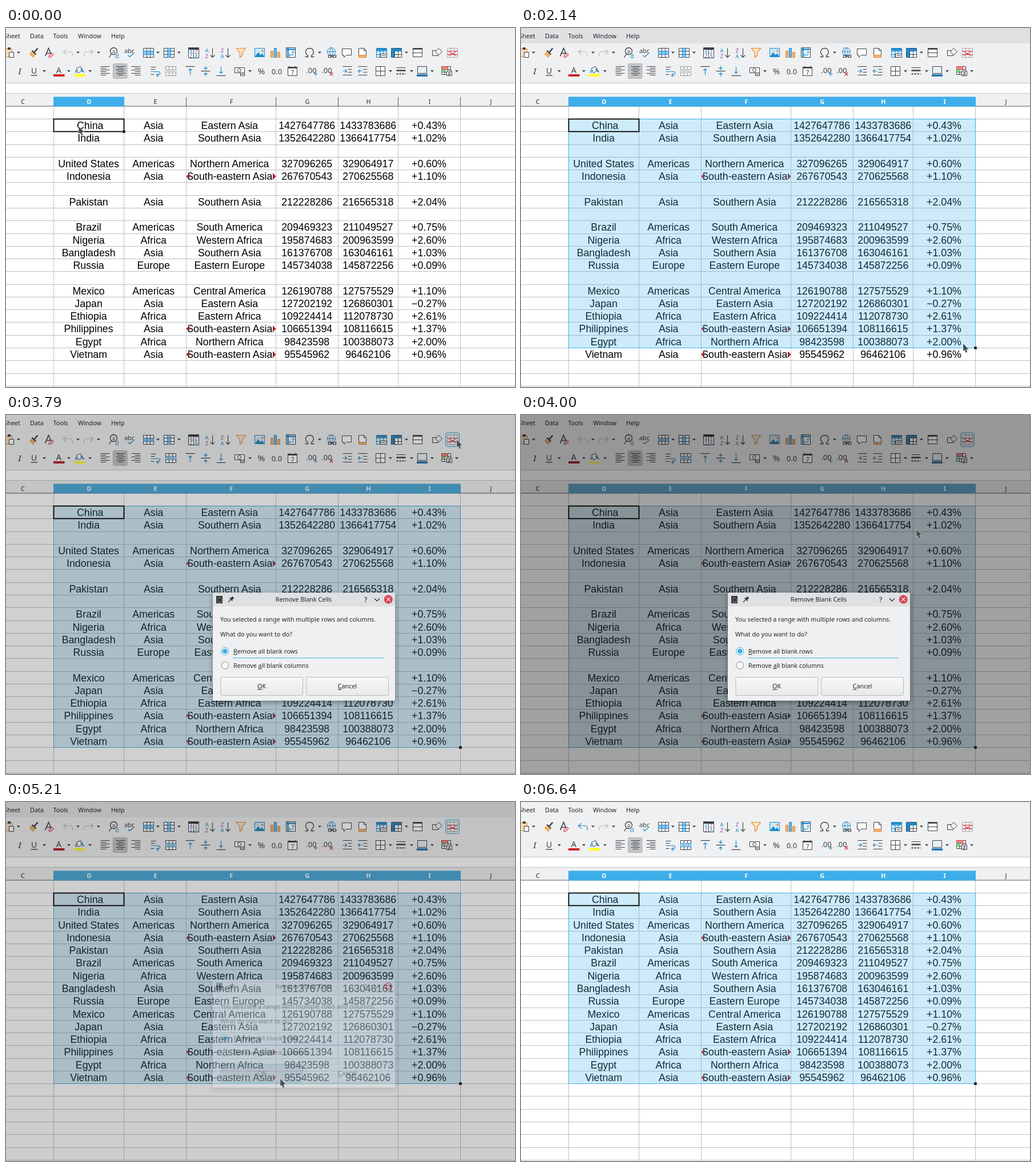
An HTML page that plays this animation: 891 by 629 pixels, repeating every 6.87 s.

```html
<!DOCTYPE html>
<html lang="en">
<head>
<meta charset="utf-8">
<title>Remove blank rows</title>
<style>
  html, body { margin: 0; width: 100%; height: 100%; overflow: hidden; background: #fff; }
  svg { display: block; width: 100vw; height: 100vh; }
  text { font-family: "Noto Sans", sans-serif; font-size: 10.8px; fill: #232629; white-space: pre; }
  .cell { font-family: "Liberation Sans", Arial, sans-serif; font-size: 17.8px; fill: #000; text-anchor: middle; }
  .mid { text-anchor: middle; }
  .u { text-decoration: underline; }
</style>
</head>
<body>
<svg id="stage" viewBox="0 0 891 629" preserveAspectRatio="none">
  <defs>
    <linearGradient id="btn" x2="0" y2="1"><stop stop-color="#f8f8f8"/><stop offset="1" stop-color="#e8e9ea"/></linearGradient>
    <linearGradient id="down" x2="0" y2="1"><stop stop-color="#c2c3c4"/><stop offset="1" stop-color="#cecfd0"/></linearGradient>
    <clipPath id="narrow"><rect x="319" y="0" width="148.5" height="23"/></clipPath>
  </defs>
</svg>
<script>
const LOOP = 6870, FRAME = 1000 / 14;
const INK = '#3b4045', BLUE = '#1e8bcd', SEL = '#3daee9', RED = '#d8303a', ORANGE = '#e8862a', GREY = '#b9bbbd';
const stage = document.getElementById('stage');

function el(name, attrs, parent) {
  const e = document.createElementNS('http://www.w3.org/2000/svg', name);
  for (const k in attrs) e.setAttribute(k, attrs[k]);
  return parent.appendChild(e);
}
const group = (p, attrs = {}) => el('g', attrs, p);
const path = (p, d, stroke = 'none', fill = 'none', w = 1) => el('path', { d, stroke, fill, 'stroke-width': w }, p);
const rect = (p, x, y, width, height, fill, more = {}) => el('rect', { x, y, width, height, fill, ...more }, p);
function text(p, x, y, s, attrs = {}) {
  const t = el('text', { x, y, ...attrs }, p);
  t.textContent = s;
  return t;
}
const set = (e, attrs) => { for (const k in attrs) e.setAttribute(k, attrs[k]); };
const show = (e, on) => e.setAttribute('visibility', on ? 'inherit' : 'hidden');

// ---- window frame
const app = group(stage);
rect(app, 0, 0, 891, 629, '#fff');
rect(app, 0, 0, 891, 137, '#eff0f1');
const menu = rect(app, 0, 0, 891, 27, '#dee0e2');
text(app, 25, 17.5, 'Sheet', { 'text-anchor': 'end' });
[[42, 'Data'], [82.5, 'Tools'], [126, 'Window'], [184, 'Help']].forEach(([x, s]) => text(app, x, 17.5, s));
rect(app, 0, 96, 891, 18, '#fff');
path(app, 'M0 96.5H891M0 114.5H891', '#c3c5c7');

// ---- toolbar
function icon(x, y, ...parts) {
  const g = group(app, { transform: `translate(${x + .5} ${y + .5})` });
  parts.forEach(p => path(g, ...p));
  return g;
}
const letter = (g, x, y, s, size, fill = INK, more = {}) =>
  text(g, x, y, s, { class: 'mid', style: `font-size:${size}px;fill:${fill}`, ...more });
const drop = (y, ...xs) => xs.forEach(x => path(app, `M${x - 3} ${y - 1.5}h6l-3 3.2z`, 'none', INK));
const box = (x, y, w, h) => `M${x} ${y}h${w}v${h}h${-w}z`;
const GRID = box(-9, -8, 18, 16) + 'M-9 -3H9M-9 3H9M-3 -8V8M3 -8V8';
const A = 43, B = 75;

icon(8, A, ['M-12 -7H2V7H-12', ORANGE, '#f9dcb9'], [box(-3, -1, 8, 9), INK, '#fff'], ['M-5 -9h4v3h-4z', INK, INK]);
icon(48, A, ['M1 -1L7 -8', INK, 'none', 2.4], ['M-7 2L-2 -3L3 2L-1 8Z', ORANGE, '#f3b563'], ['M-3 -4L4 3', INK, 'none', 2]);
icon(75, A, ['M-7 6L-1 -8L5 6M-5 1H3', INK, 'none', 1.6], ['M-1 6L5 0L8 3L3 8H0Z', RED, '#f3b5b8']);
const undo = icon(108, A, ['M-3 -6L-8 -2L-3 3M-8 -2H3Q8 -2 8 6', GREY, 'none', 1.2]).firstChild;
icon(144, A, ['M3 -6L8 -2L3 3M8 -2H-3Q-8 -2 -8 6', GREY, 'none', 1.2]);
const find = icon(189, A, ['M5 -3A6 6 0 1 1 -7 -3A6 6 0 1 1 5 -3ZM-5 2L-9 8', INK, 'none', 1.3]);
letter(find, -1, 0, 'a', 9); letter(find, 5, 9, 'd', 11, BLUE);
const spell = icon(216, A, ['M-3 4L0 7L7 1', BLUE, 'none', 1.3]);
letter(spell, -.5, 0, 'abc', 11);
icon(249, A, [GRID, INK, '#fff'], [box(-9, -3, 18, 6), BLUE, '#8cc6ec'], ['M-3 -3V3M3 -3V3', BLUE]);
icon(285, A, [GRID, INK, '#fff'], [box(-3, -8, 6, 16), BLUE, '#8cc6ec'], ['M-3 -3H3M-3 3H3', BLUE]);
const sort = icon(328, A, [box(-9, -9, 18, 18), INK, '#fff'], ['M-9 -7H9', INK, 'none', 3], ['M0 -6V9', INK]);
[[-4.5, 1, 'A', BLUE], [4.5, 1, 'Z', '#8a4baf'], [-4.5, 8.5, 'Z', '#8a4baf'], [4.5, 8.5, 'A', BLUE]]
  .forEach(([x, y, s, c]) => letter(sort, x, y, s, 8, c));
[[356, 'A', 'Z'], [383, 'Z', 'A']].forEach(([x, a, b]) => {
  const g = icon(x, A, ['M5 -8V8M1 4L5 8L9 4', INK, 'none', 1.1]);
  letter(g, -5, -1, a, 9.5, a === 'A' ? BLUE : '#8a4baf');
  letter(g, -5, 9, b, 9.5, b === 'A' ? BLUE : '#8a4baf');
});
icon(411, A, ['M-8 -8H8L2 0V5L-2 8V0Z', ORANGE, '#fbe6c8', 1.2]);
icon(444, A, [box(-9, -8, 17, 15), BLUE, '#cfe8f8'], ['M-9 7L-3 -1L1 4L4 1L8 7Z', 'none', BLUE], ['M3 -5h3v3h-3z', 'none', ORANGE]);
icon(471, A, [box(-8, -3, 4, 11), ORANGE, '#f6b26b'], [box(-2, -8, 4, 16), BLUE, '#6bb6e6'], [box(4, -1, 4, 9), ORANGE, '#f6b26b']);
icon(498, A, [box(-8, -9, 16, 17), INK, '#fff'], ['M-8 -6H8M-5 -9V8', BLUE, 'none', 2.5], ['M-2 4H4V-2M-1 1L-3 4L-1 7M1 0L4 -3L7 0', BLUE]);
icon(531, A, ['M-8 7H-3V5Q-7 2 -7 -2Q-6 -8 0 -8Q6 -8 7 -2Q7 2 3 5V7H8', INK, 'none', 1.3]);
icon(569, A, ['M7 -2A7 7 0 1 1 -7 -2A7 7 0 1 1 7 -2ZM-7 -2H7M0 -9Q-6 -2 0 5Q6 -2 0 -9', BLUE], ['M-5 4h5v4h-5zM3 4h5v4h-5zM-2 6H5', INK, 'none', 1.2]);
icon(596, A, ['M-8 -7H8V4H-1L-5 8V4H-8Z', INK, '#fff']);
icon(623, A, ['M-6 -8H3L7 -4V8H-6Z', INK, '#fff'], ['M-6 4H7V8H-6Z', ORANGE, '#f6b26b'], ['M3 -8V-4H7', INK]);
icon(657, A, [GRID, BLUE, '#d8edf9'], ['M-9 -6H9', BLUE, 'none', 4], [box(-2, 2, 11, 6), INK, '#fff'], ['M0 5H7', INK]);
icon(683, A, [GRID, INK, '#fff'], ['M-9 -5H9M-6 -8V8', BLUE, 'none', 5], ['M-1 3H8M3 -1V8', INK]);
icon(720, A, [box(-8, -8, 16, 15), INK, '#fff'], ['M-8 -7H8', INK, 'none', 2.5], ['M-9 0H9', INK, 'none', 1]);
icon(754, A, ['M-8 -4h10v9h-10z', INK], ['M3 -8L9 -2L3 4L-3 -2Z', INK, '#eff0f1']);
const hover = rect(app, 769.5, 31, 24, 24.5, '#d3e5ef', { rx: 3, stroke: SEL });
icon(781, A, [box(-9, -8, 18, 16) + 'M-3 -8V8M3 -8V8', '#a5a8ab', '#f7f7f7'], ['M-9 -3H9M-9 3H9', RED], ['M-7 -2L7 5M-7 5L7 -2', RED]);
drop(A, 22, 126, 162, 266, 303, 549, 701);

letter(app, 24, 80.5, 'I', 15, INK, { 'font-style': 'italic', 'font-family': 'Noto Serif' }).style.fontFamily = '"Noto Serif", serif';
letter(app, 49, 79.5, 'U', 14); path(app, 'M43.5 83H55', INK, 'none', 1.3);
letter(app, 92.5, 79, 'A', 14.5); rect(app, 83, 81, 19.5, 4, '#d01f26');
icon(128, B, ['M-5 -5L2 -8L6 -1L-2 3Z', INK, '#fff'], ['M-6 -2L-6 3', BLUE, 'none', 2], ['M2 -4L8 2', BLUE, 'none', 2]);
rect(app, 119, 81, 19, 4, '#ffff00');
rect(app, 187.5, 62.5, 24.5, 26, '#c3c5c7', { rx: 2, stroke: '#b2b4b6' });
[[173, -8], [200, -5], [227, -2]].forEach(([x, s]) => {
  let d = '';
  for (let i = 0; i < 6; i++) d += i % 2 ? `M${s} ${i * 3 - 8}h10` : `M-8 ${i * 3 - 8}h16`;
  icon(x, B, [d, INK]);
});
icon(261, B, ['M-8 -7H1M-8 -3H-1M-8 6H-2', INK], ['M-8 1H6Q8 1 8 4Q8 7 3 7M5 4L2 7L5 10', BLUE, 'none', 1.2]);
const merge = icon(288, B, [GRID, INK, '#fff'], [box(-9, -3, 18, 6), BLUE, '#cfe8f8'], ['M-6 0H6M-4 -2L-6 0L-4 2M4 -2L6 0L4 2', BLUE]);
[[322, -8, 'M0 7V-4M-3 -1L0 -4L3 -1'], [349, 0, 'M0 -9V-3M-3 -6L0 -3L3 -6M0 9V3M-3 6L0 3L3 6'], [376, 8, 'M0 -8V4M-3 1L0 4L3 1']]
  .forEach(([x, y, d]) => icon(x, B, [`M-8 ${y}H8`, INK, 'none', 1.2], [d, BLUE, 'none', 1.2]));
icon(409, B, [box(-9, -6, 17, 9), INK, '#fff'], ['M2 -1.5A3 3 0 1 1 -4 -1.5A3 3 0 1 1 2 -1.5Z', INK], ['M1 3h7v5h-7zM1 5.5H8', INK, '#fff']);
letter(app, 447, 80.5, '%', 15);
letter(app, 474, 80.5, '0.0', 13);
const date = icon(501, B, [box(-8, -7, 16, 15), INK, '#fff'], ['M-8 -6H8', INK, 'none', 2.5], ['M-5 -9V-5M5 -9V-5', INK]);
letter(date, 0, 6, '7', 10);
[[535, BLUE, 'M3 5H10M6.5 1.5V8.5'], [562, RED, 'M4 2L10 8M10 2L4 8']].forEach(([x, c, d]) => {
  letter(icon(x, B, [d, c, 'none', 1.2]), -1, 3, '.00', 13);
});
[[597, 'M-8 0H-1M-4 -3L-1 0L-4 3'], [624, 'M-1 0H-8M-5 -3L-8 0L-5 3']]
  .forEach(([x, d]) => icon(x, B, ['M-8 -8H8M1 -3H8M1 2H8M-8 7H8', INK], [d, BLUE, 'none', 1.2]));
icon(655, B, [box(-8, -8, 16, 16) + 'M0 -8V8M-8 0H8', INK, '#fff']);
icon(691, B, ['M-8 -6H8', INK, 'none', 1], ['M-8 -1H8', INK, 'none', 2.5], ['M-8 5H8', INK, 'none', 2], ['M-5 5h2M0 5h2M5 5h2', '#eff0f1', 'none', 3]);
icon(728, B, [box(-8, -8, 16, 12), INK, '#e4f1f9']); rect(app, 719, 81, 19, 4, '#2a7ab8');
icon(771, B, [box(-9, -8, 16, 14) + 'M-9 -3H7M-9 2H7M-4 -8V6M2 -8V6', INK, '#fff'], [box(-9, -8, 11, 5), RED, '#ef8b8f'],
  [box(-9, -3, 6, 5), '#3a9a4a', '#8dcf98'], [box(0, 0, 9, 8), INK, '#fff'], ['M2 3H7M2 6H7M6 1L3 8', INK]);
drop(B + .5, 67, 110, 147, 427, 673, 710, 746, 789);

// ---- sheet
const cols = [83.5, 206.5, 315.5, 472.5, 581.5, 686.5, 795.5];
const centers = [144.6, 258.2, 391.3, 526.7, 633.8, 740.5];
const rowY = k => Math.round(159 + 22.28 * k) + .5;
let lines = '';
for (let k = 0; k < 22; k++) lines += `M0 ${rowY(k)}H891`;
cols.forEach(x => lines += `M${x} 137V629`);
path(app, lines, '#c0c0c0');
path(app, 'M0 137H891' + cols.map(x => `M${x} 121V137`).join(''), '#55585b');
text(app, 29.5, 132.5, 'C', { class: 'mid' });
text(app, 849, 132.5, 'J', { class: 'mid' });
const heads = [...'DEFGHI'].map((s, i) => {
  const bg = rect(app, cols[i] - .5, 120.5, cols[i + 1] - cols[i] + 1, 17, SEL);
  const edge = path(app, `M${cols[i + 1]} 121V137`, '#3592c5');
  return { bg, edge, label: text(app, (cols[i] + cols[i + 1]) / 2 + .5, 132.5, s, { class: 'mid' }) };
});

const rows = `China|Asia|Eastern Asia|1427647786|1433783686|+0.43%
India|Asia|Southern Asia|1352642280|1366417754|+1.02%

United States|Americas|Northern America|327096265|329064917|+0.60%
Indonesia|Asia|South-eastern Asia|267670543|270625568|+1.10%

Pakistan|Asia|Southern Asia|212228286|216565318|+2.04%

Brazil|Americas|South America|209469323|211049527|+0.75%
Nigeria|Africa|Western Africa|195874683|200963599|+2.60%
Bangladesh|Asia|Southern Asia|161376708|163046161|+1.03%
Russia|Europe|Eastern Europe|145734038|145872256|+0.09%

Mexico|Americas|Central America|126190788|127575529|+1.10%
Japan|Asia|Eastern Asia|127202192|126860301|−0.27%
Ethiopia|Africa|Eastern Africa|109224414|112078730|+2.61%
Philippines|Asia|South-eastern Asia|106651394|108116615|+1.37%
Egypt|Africa|Northern Africa|98423598|100388073|+2.00%
Vietnam|Asia|South-eastern Asia|95545962|96462106|+0.96%`.split('\n')
  .map((line, full) => ({ line, full })).filter(r => r.line);
rows.forEach((r, packed) => {
  r.packed = packed;
  r.g = group(app);
  r.line.split('|').forEach((s, i) => {
    const long = s.startsWith('South-');
    const t = text(r.g, centers[i] + (s === 'China' ? 2.6 : 0), 17.8, s, { class: 'cell' });
    if (long) {
      t.setAttribute('clip-path', 'url(#narrow)');
      path(r.g, 'M316 11.5l4.5 -5v10zM472 11.5l-4.5 -5v10z', '#4a1010', '#d3141c', .7);
    }
  });
});
const tint = rect(app, 83.5, 159.5, 0, 0, SEL, { 'fill-opacity': .25, stroke: SEL });
rect(app, 83.5, 159.5, 123, 22, 'none', { stroke: '#000', 'stroke-width': 1.8 });
const handle = rect(app, 0, 0, 5, 5, '#000', { stroke: '#fff', 'stroke-width': .5 });

const tip = group(app, { style: 'filter:drop-shadow(0 1px 2px rgba(0,0,0,.3))' });
rect(tip, 768.5, 92.5, 78.5, 20.5, '#f6f6f6', { rx: 3, stroke: '#c2c4c6' });
text(tip, 807.7, 107, 'Conditional', { class: 'mid', style: 'font-size:11.8px;font-weight:bold;fill:#77797b' });

// ---- dialog
const dlg = group(stage, { style: 'filter:drop-shadow(0 3px 5px rgba(0,0,0,.4))' });
rect(dlg, 362, 311.5, 319, 189, '#eff0f1', { rx: 2 });
rect(dlg, 362, 311.5, 319, 24, '#dee0e2', { rx: 2 });
text(dlg, 521, 327.3, 'Remove Blank Cells', { class: 'mid' });
path(dlg, 'M368 317h11v13h-11z', 'none', '#2f3337');
path(dlg, 'M371 320h4l2 2v6h-6z', '#8d9194');
path(dlg, 'M389 328l4 -4', INK, 'none', 1.2);
path(dlg, 'M391 321l3 0l2 -3l3 3l-3 2l0 3z', INK, INK);
text(dlg, 629.5, 328, '?', { class: 'mid', style: 'font-size:13px' });
path(dlg, 'M645 321.5l4.5 4.5l4.5 -4.5', '#232629', 'none', 1.1);
el('circle', { cx: 669.3, cy: 323, r: 7.6, fill: '#da4453' }, dlg);
path(dlg, 'M666 319.7l6.6 6.6M672.6 319.7l-6.6 6.6', '#fff', 'none', 1.1);
text(dlg, 375, 361.8, 'You selected a range with multiple rows and columns.');
text(dlg, 375, 388.3, 'What do you want to do?');
function mnemonic(x, y, a, u, b, attrs) {
  const t = text(dlg, x, y, a, attrs);
  el('tspan', { class: 'u' }, t).textContent = u;
  el('tspan', {}, t).textContent = b;
}
const ring = (y, r, stroke, fill) => el('circle', { cx: 383.3, cy: y, r, stroke, fill }, dlg);
ring(413.7, 6.5, SEL, '#f7f7f7'); ring(413.7, 4.3, 'none', SEL);
ring(438.7, 6.3, '#85888b', '#f7f7f7');
mnemonic(398, 418, '', 'R', 'emove all blank rows');
mnemonic(398, 443, 'Remove ', 'a', 'll blank columns');
path(dlg, 'M397 425.7H661', SEL);
const ok = rect(dlg, 376, 459.5, 143.5, 32, 'url(#btn)', { rx: 2, stroke: GREY });
rect(dlg, 526, 459.5, 143.5, 32, 'url(#btn)', { rx: 2, stroke: GREY });
mnemonic(447.5, 479.3, '', 'O', 'K', { class: 'mid' });
mnemonic(597.5, 479.3, '', 'C', 'ancel', { class: 'mid' });

const cursor = path(stage, 'M0 0V13.8L2.8 11.6L4.6 16.6L7.6 15.4L5.8 10.6H10Z', '#e8e8e8', '#45474a', .6);

// ---- motion, in steps of 1/14 s
const lin = p => p, quadIn = p => p * p, cubicOut = p => 1 - (1 - p) ** 3;
const inOut = p => p < .5 ? 4 * p ** 3 : 1 - 4 * (1 - p) ** 3;
const route = [
  [4, 127, 172, lin], [14, 470, 334, quadIn], [16, 604, 410, lin], [24, 775, 552, cubicOut],
  [29, 775, 552, lin], [34, 741, 569, inOut], [36, 741, 569, lin], [46, 783, 51, inOut],
  [53, 789, 43, inOut], [56, 692, 200, quadIn], [66, 480, 484.5, cubicOut],
  [77, 480, 484.5, lin], [80, 215, 196, inOut], [82, 215, 196, lin], [92, 40, -20, inOut]
];
function pointer(n) {
  const i = route.findIndex(k => n <= k[0]);
  if (i < 0) return route[route.length - 1].slice(1, 3);
  if (!i) return route[0].slice(1, 3);
  const [n0, x0, y0] = route[i - 1], [n1, x1, y1, ease] = route[i];
  const p = ease((n - n0) / (n1 - n0));
  return [x0 + (x1 - x0) * p, y0 + (y1 - y0) * p];
}
const ramp = (n, a, b) => Math.min(1, Math.max(0, (n - a) / (b - a)));

function draw(ms) {
  const n = Math.floor((ms + 6) / FRAME);
  const [x, y] = pointer(n);
  cursor.setAttribute('transform', `translate(${x} ${y})`);

  const packed = n >= 73;
  rows.forEach(r => r.g.setAttribute('transform', `translate(0 ${rowY(packed ? r.packed : r.full)})`));

  // the selection trails the pointer slightly
  const [dx, dy] = pointer(Math.min(n, 34));
  let c = 0, k = 0;
  while (c < 5 && dx - 7 > cols[c + 1]) c++;
  while (dy - 7 > rowY(k + 1)) k++;
  if (packed) k = 14;
  const right = cols[c + 1], bottom = rowY(k + 1);
  set(tint, { width: right - 83.5, height: bottom - 159.5 });
  show(tint, c + k > 0);
  set(handle, { x: right - 2.5, y: bottom - 2.5 });
  heads.forEach((h, i) => {
    show(h.bg, i <= c);
    show(h.edge, i < c);
    h.label.style.fill = i <= c ? '#fff' : '';
    h.label.style.fontWeight = i <= c ? 'bold' : '';
  });

  const active = ramp(n, 1, 3) * (1 - ramp(n, 48, 51) + ramp(n, 71, 74)) * (1 - ramp(n, 90, 93));
  menu.setAttribute('opacity', active);
  merge.style.filter = n < 34 ? 'grayscale(1)' : '';
  merge.setAttribute('opacity', n < 34 ? .5 : 1);
  undo.setAttribute('stroke', n < 83 ? GREY : BLUE);
  show(hover, n >= 45 && n < 78);
  tip.setAttribute('opacity', ramp(n, 43, 46) * (1 - ramp(n, 46, 49)));

  const dim = n < 71 ? ramp(n, 50, 56) : (1 - ramp(n, 71, 76)) ** 1.3;
  app.style.filter = dim ? `saturate(${1 - .4 * dim}) brightness(${1 - .37 * dim})` : '';
  const alpha = ramp(n, 49, 52) * (1 - ramp(n, 71, 74));
  dlg.setAttribute('opacity', alpha);
  show(dlg, alpha > 0);
  const over = n < 77 && x > 376 && x < 519.5 && y > 459.5 && y < 491.5;
  set(ok, { stroke: over ? SEL : GREY, fill: n >= 70 ? 'url(#down)' : 'url(#btn)' });
}

const start = performance.now();
function tick() {
  draw((performance.now() - start) % LOOP);
  requestAnimationFrame(tick);
}
tick();
</script>
</body>
</html>
```
